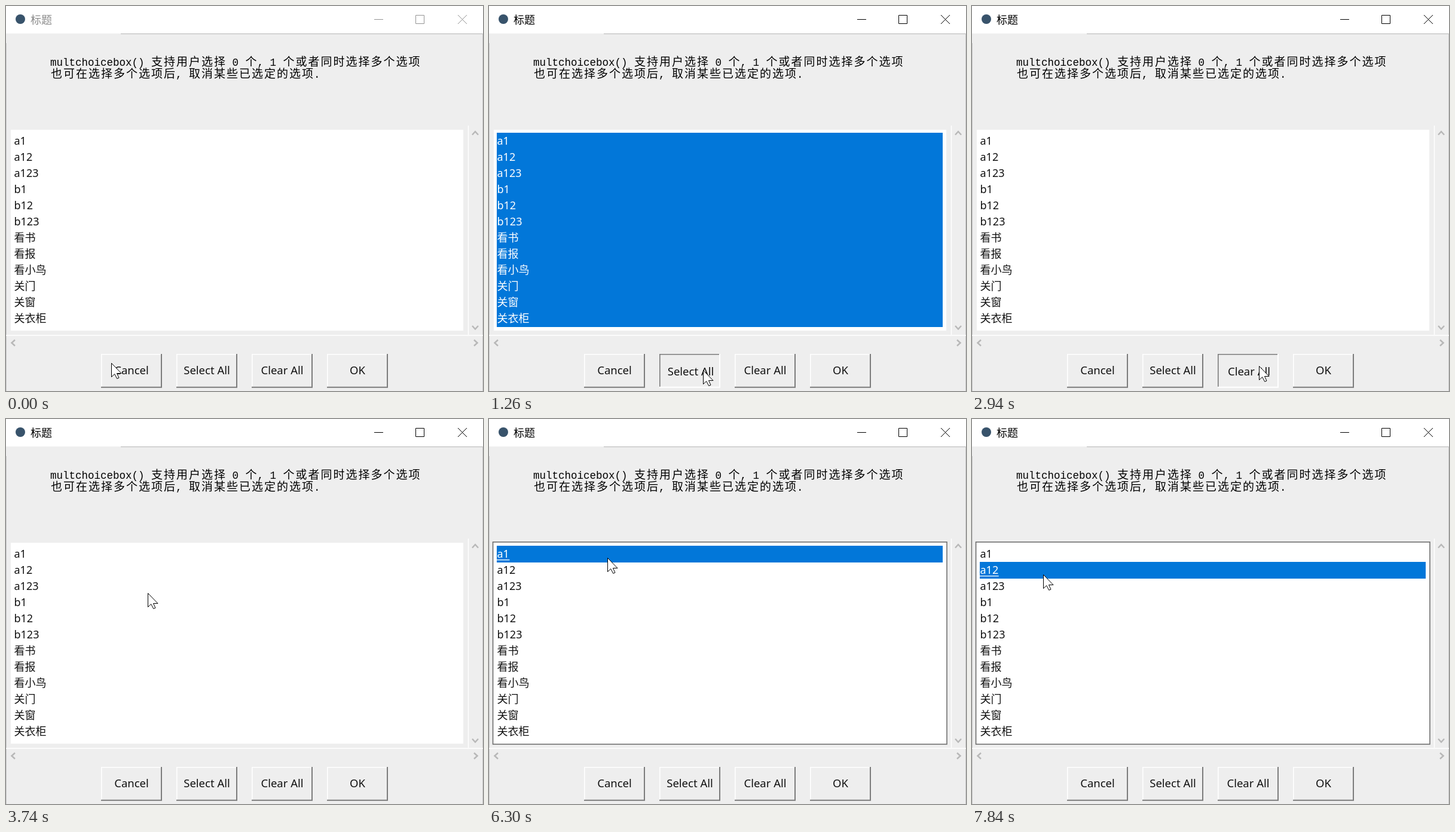
Write an HTML page that moves like this. It is 798 by 644 pixels and loops after 8 s.

```html
<!DOCTYPE html>
<html lang="zh">
<head>
<meta charset="utf-8">
<style>
html, body { margin: 0; width: 100%; height: 100%; overflow: hidden; background: #eee; }
svg { display: block; width: 798px; height: 644px; }
text { font: 18px "Noto Sans", "Noto Sans CJK SC", "Noto Sans CJK", sans-serif; white-space: pre; }
.cjk { font: 19px "Noto Sans CJK SC", "Noto Sans CJK", sans-serif; letter-spacing: 2px; }
.mono { font: 17.5px "Liberation Mono", monospace; }
.button text { font-size: 18.5px; text-anchor: middle; fill: #111; }
.line { fill: none; }
</style>
</head>
<body>
<svg id="stage" viewBox="0 0 798 644"></svg>
<script>
const LOOP = 8000, TICK = 140 / 3;
const ITEMS = ['a1', 'a12', 'a123', 'b1', 'b12', 'b123', '看书', '看报', '看小鸟', '关门', '关窗', '关衣柜'];
const stage = document.getElementById('stage');

function add(tag, attrs, parent = stage, content = '') {
  const node = document.createElementNS('http://www.w3.org/2000/svg', tag);
  for (const key in attrs) node.setAttribute(key, attrs[key]);
  node.textContent = content;
  parent.append(node);
  return node;
}
const rect = (x, y, width, height, fill, parent) => add('rect', { x, y, width, height, fill }, parent);
const path = (d, stroke, width = 1, parent) => add('path', { class: 'line', d, stroke, 'stroke-width': width }, parent);
const show = (node, on) => node.setAttribute('visibility', on ? 'visible' : 'hidden');

// Window frame
rect(0, 0, 798, 644, '#eee');
rect(0, 0, 798, 46, '#fff');
path('M192 46.5H798', '#b5b5b5');
path('M.5 62V644M797.5 46V644', '#c8c8c8');
add('circle', { cx: 24, cy: 22, r: 8, fill: '#38536b' });
const title = add('text', { x: 41, y: 29.5 }, stage, '标题');
const controls = path('M616 22.5H631M685.5 15.5H699.5V29.5H685.5ZM756 15L771 30M771 15L756 30', '#000');

// Message on a grid of half-width cells
function message(line, y) {
  let x = 74;
  for (const run of line.match(/[ -~]+|[^ -~]+/g)) {
    const latin = run.charCodeAt(0) < 128;
    add('text', { x: latin ? x : x + 1, y, class: latin ? 'mono' : 'cjk' }, stage, run);
    x += run.length * (latin ? 10.5 : 21);
  }
}
message('multchoicebox() 支持用户选择 0 个, 1 个或者同时选择多个选项', 100);
message('也可在选择多个选项后, 取消某些已选定的选项.', 120);

// List
rect(8, 207, 757, 336, '#fff');
const border = path('M6.5 205.7H766V544H6.5Z', '#6a6a6a', 1.5);
const rows = ITEMS.map((item, i) => {
  const y = 212 + 27 * i;
  const band = rect(13, y, 746, 28, '#0277d9');
  const label = add('text', { x: 13.5, y: y + 20 }, stage, item);
  const underline = rect(13, y + 23, label.getComputedTextLength() + 1, 1.3, '#000');
  return { band, label, underline };
});

// Scroll bars
path('M773.5 200V550M0 551H798', '#fff', 1.5);
path('M780 215.5L785 210L790 215.5M780 535L785 540.5L790 535M15 558.5L9.5 563.5L15 568.5M783 558.5L788.5 563.5L783 568.5', '#b8b8b8', 2.5);

// Buttons
const buttons = ['Cancel', 'Select All', 'Clear All', 'OK'].map((name, i) => {
  const g = add('g', { class: 'button', transform: `translate(${159 + 126 * i} 582)` });
  return {
    topLeft: path('M.8 56V.8H102', '#fff', 1.6, g),
    bottomRight: path('M0 55.8H101V0', '#fff', 2, g),
    label: add('text', { x: 51, y: 34 }, g, name)
  };
});

const cursor = add('path', {
  d: 'M.5 .5V23.5L5.7 18.6L9.7 26.3L13 25L9.5 17.5H17Z',
  fill: '#fff', stroke: '#000', 'stroke-linejoin': 'round'
});

// Pointer moves: start, end, target x, target y
const MOVES = [
  [0, 420, 367, 610], [840, 980, 358, 609], [2053, 2380, 480, 602],
  [3313, 3880, 188, 229], [5600, 5700, 192, 233], [5933, 6120, 198, 232],
  [7093, 7330, 130, 270], [7330, 7470, 119, 260]
];

function pointer(t) {
  const now = Math.floor((t + 4) / TICK) * TICK;
  let x = 176, y = 597;
  for (const [start, end, toX, toY] of MOVES) {
    const p = Math.min(1, Math.max(0, (now - start) / (end - start)));
    const e = p * p * (3 - 2 * p);
    x += (toX - x) * e;
    y += (toY - y) * e;
  }
  return [Math.round(x), Math.round(y)];
}

function draw(t) {
  const within = (from, to) => t >= from && t < to;
  const active = t >= 1210;
  title.setAttribute('fill', active ? '#000' : '#8c8c8c');
  controls.setAttribute('stroke', active ? '#000' : '#949494');
  show(border, t >= 4250);

  const all = within(1260, 2940);
  const current = t < 4250 ? -1 : t < 7660 ? 0 : 1;
  rows.forEach(({ band, label, underline }, i) => {
    const on = all || (i === 0 && within(4250, 6400)) || (i === 1 && t >= 7660);
    show(band, on);
    show(underline, i === current);
    label.setAttribute('fill', on ? '#fff' : '#111');
    underline.setAttribute('fill', on ? '#fff' : '#111');
  });

  buttons.forEach(({ topLeft, bottomRight, label }, i) => {
    const down = (i === 1 && within(1260, 1490)) || (i === 2 && within(2940, 3080));
    topLeft.setAttribute('stroke', down ? '#7c7c7c' : '#fff');
    bottomRight.setAttribute('stroke', down ? '#fff' : '#7c7c7c');
    label.setAttribute('transform', down ? 'translate(1.5 1.5)' : '');
  });

  cursor.setAttribute('transform', `translate(${pointer(t)})`);
}

function loop() {
  draw(performance.now() % LOOP);
  requestAnimationFrame(loop);
}
loop();
</script>
</body>
</html>
```
